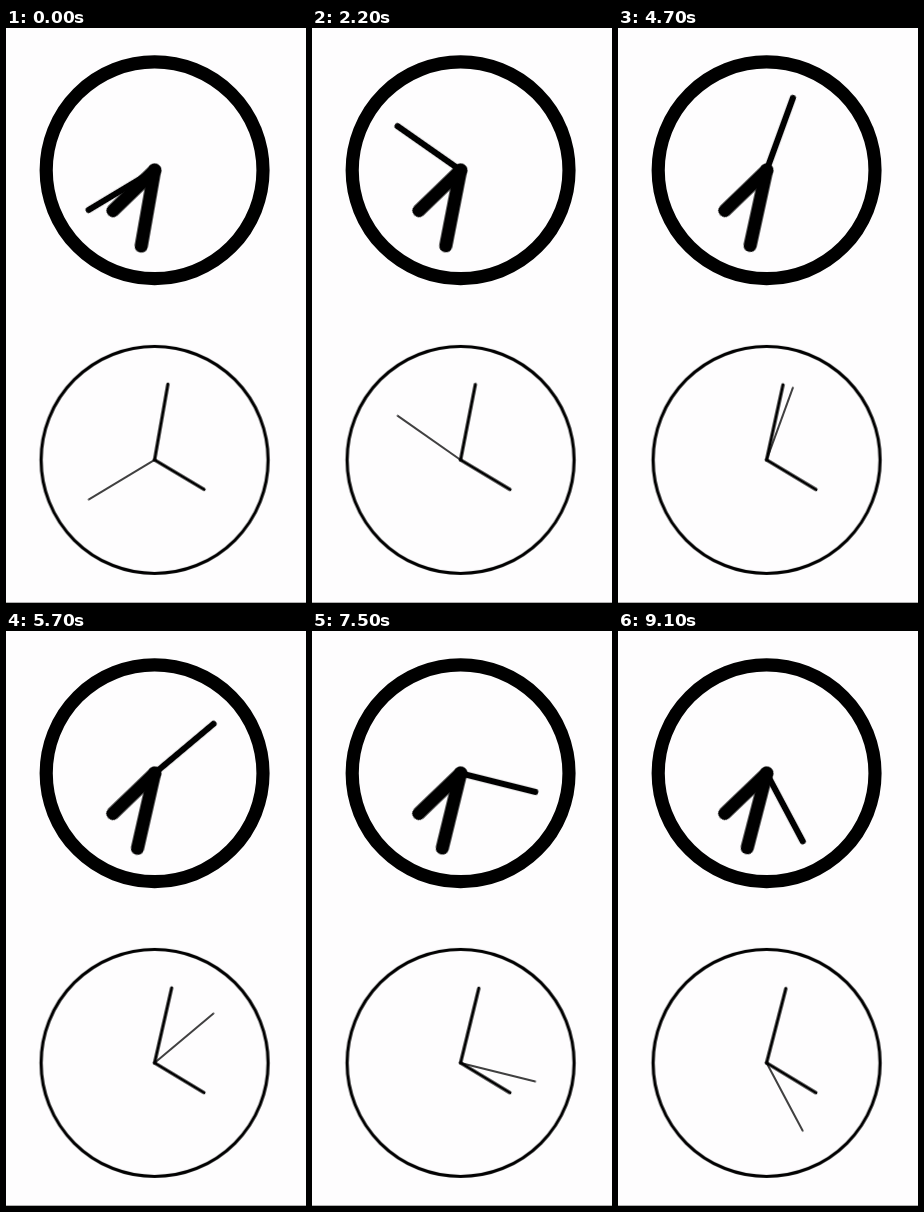
Animation of 300 by 575 pixels, one loop 9200 ms. Source, as an HTML page:

```html
<!DOCTYPE html>
<html lang="en">
<head>
<meta charset="utf-8">
<title>Two clocks</title>
<style>
  html, body { margin: 0; width: 100%; height: 100%; overflow: hidden; background: #fefdfe; }
  svg { display: block; }
  .clock { fill: none; stroke: #000; stroke-linecap: round; }
  .bold { stroke-width: 13.2px; }
  .bold .second { stroke-width: 6.2px; }
  .thin { stroke-width: 3.2px; }
  .thin .second { stroke-width: 1.5px; }
  .hand { animation: turn 9.2s steps(92, end) infinite; }
  .second { --from: 239deg; --sweep: 276deg; }
  .minute { --sweep: 4.6deg; }
  .hour { --sweep: 0.3833deg; }
  .bold .minute { --from: 189.98deg; }
  .bold .hour { --from: 225.83deg; }
  .thin .minute { --from: 9.98deg; }
  .thin .hour { --from: 120.83deg; }
  @keyframes turn {
    from { transform: rotate(var(--from)); }
    to { transform: rotate(calc(var(--from) + var(--sweep))); }
  }
</style>
</head>
<body>
<svg width="300" height="575" viewBox="0 0 300 575">
  <g class="clock bold" transform="translate(148.6 142.3)">
    <circle r="108.4"/>
    <path class="hand hour" d="M0 0V-58"/>
    <path class="hand minute" d="M0 0V-77"/>
    <path class="hand second" d="M0 0V-77"/>
  </g>
  <g class="clock thin" transform="translate(148.6 431.9)">
    <circle r="113.5"/>
    <path class="hand hour" d="M0 0V-57.6"/>
    <path class="hand minute" d="M0 0V-77"/>
    <path class="hand second" d="M0 0V-77"/>
  </g>
  <rect y="574" width="300" height="1" fill="#b0b0b0"/>
</svg>
</body>
</html>
```
